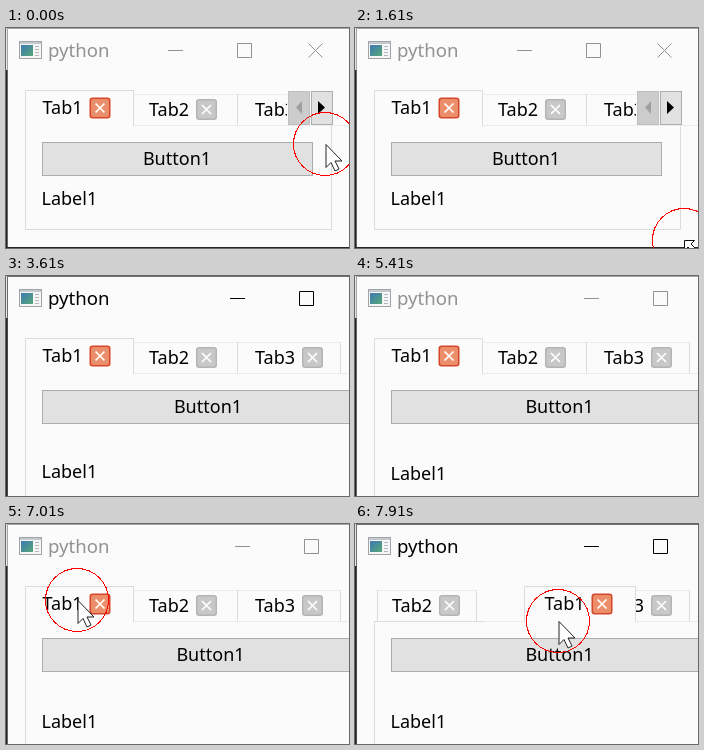
These frames come from a looping animation (343x220 px, 8 s). An HTML page:

```html
<!DOCTYPE html>
<html lang="en">
<head>
<meta charset="utf-8">
<title>Tab window</title>
<style>
  html, body { margin: 0; width: 100%; height: 100%; overflow: hidden; background: #fbfbfb; }
  svg { display: block; width: 343px; height: 220px; animation: grow 8s step-end infinite, focus 8s step-end infinite; }
  text { font: 18px "Noto Sans", "Open Sans", sans-serif; fill: #000; }
  .title { font-size: 18.6px; fill: var(--ink); }
  .glyph { fill: none; stroke: var(--ink); }
  .edge { fill: var(--edge); }
  .line { fill: none; stroke: #dcdcdc; }
  .faint { fill: none; stroke: #ececec; }
  .tab { fill: #fbfbfb; stroke: #dcdcdc; }
  .button { fill: #e1e1e1; stroke: #adadad; }

  /* Everything that follows the window size */
  .controls { transform: translateX(calc(var(--dw) * 1px)); }
  .pane { width: calc(306px + var(--dw) * 1px); height: calc(104px + var(--dw) * .806px); }
  .wide { width: calc(270px + var(--dw) * 1px); }
  .middle { transform: translateX(calc(var(--dw) * .5px)); }
  .label { transform: translateY(calc(var(--dw) * .41px)); }
  .bottom { transform: translateY(calc(var(--dw) * .806px)); }

  .scroll { animation: scroll 8s step-end infinite; }
  .drag { animation: drag 8s step-end infinite; }
  .lifted { animation: lifted 8s step-end infinite; }
  .swap { animation: swap 8s step-end infinite; }
  .pointer { animation: move 8s step-end infinite; }
  .arrow { animation: arrow 8s step-end infinite; }
  .sizer { animation: sizer 8s step-end infinite; }

  @keyframes focus {
    0%, 67.5% { --ink: #929292; --edge: #a6a6a6; }
    35%, 92.5% { --ink: #000; --edge: #6e6e6e; }
    100% { --ink: #000; --edge: #6e6e6e; }
  }
  @keyframes grow {
    0% { --dw: 0; }
    37.5% { --dw: 2; }
    38.75% { --dw: 8; }
    40% { --dw: 18; }
    41.25% { --dw: 30; }
    42.5% { --dw: 43; }
    43.75% { --dw: 54; }
    45% { --dw: 62; }
    46.25% { --dw: 65; }
    47.5% { --dw: 66; }
    50%, 100% { --dw: 67; }
  }
  @keyframes scroll {
    0% { visibility: visible; }
    40%, 100% { visibility: hidden; }
  }
  @keyframes drag {
    0% { transform: none; }
    93.75% { transform: translateX(8px); }
    95% { transform: translateX(42px); }
    96.25% { transform: translateX(80px); }
    97.5% { transform: translateX(120px); }
    98.75%, 100% { transform: translateX(153px); }
  }
  @keyframes lifted {
    0% { visibility: hidden; }
    93.75%, 100% { visibility: visible; }
  }
  @keyframes swap {
    0% { transform: none; }
    96.25% { transform: translateX(-24px); }
    97.5% { transform: translateX(-80px); }
    98.75%, 100% { transform: translateX(-106px); }
  }
  @keyframes arrow {
    0%, 55% { visibility: visible; }
    17.5% { visibility: hidden; }
    100% { visibility: visible; }
  }
  @keyframes sizer {
    0%, 55% { visibility: hidden; }
    17.5% { visibility: visible; }
    100% { visibility: hidden; }
  }
  @keyframes move {
    0% { transform: translate(319px, 116px); }
    1.25% { transform: translate(320px, 120px); }
    2.5% { transform: translate(323px, 133px); }
    3.75% { transform: translate(327px, 150px); }
    5% { transform: translate(332px, 170px); }
    6.25% { transform: translate(336px, 187px); }
    7.5% { transform: translate(339px, 200px); }
    8.75% { transform: translate(341px, 207px); }
    10% { transform: translate(342px, 210px); }
    12.5% { transform: translate(340px, 211px); }
    16.25% { transform: translate(334px, 211px); }
    17.5% { transform: translate(328px, 210px); }
    20% { transform: translate(329px, 212px); }
    37.5% { transform: translate(331px, 214px); }
    38.75% { transform: translate(337px, 218px); }
    40% { transform: translate(347px, 226px); }
    41.25% { transform: translate(359px, 236px); }
    42.5% { transform: translate(372px, 247px); }
    43.75% { transform: translate(400px, 280px); }
    55% { transform: translate(246px, 251px); }
    56.25% { transform: translate(245px, 251px); }
    57.5% { transform: translate(400px, 280px); }
    77.5% { transform: translate(318px, 226px); }
    78.75% { transform: translate(262px, 188px); }
    80% { transform: translate(188px, 137px); }
    81.25% { transform: translate(110px, 84px); }
    82.5% { transform: translate(52px, 51px); }
    83.75% { transform: translate(33px, 57px); }
    85% { transform: translate(48px, 69px); }
    86.25% { transform: translate(64px, 75px); }
    87.5% { transform: translate(71px, 76px); }
    88.75% { transform: translate(58px, 76px); }
    90% { transform: translate(50px, 76px); }
    93.75% { transform: translate(58px, 78px); }
    95% { transform: translate(92px, 83px); }
    96.25% { transform: translate(130px, 88px); }
    97.5% { transform: translate(170px, 93px); }
    98.75%, 100% { transform: translate(203px, 97px); }
  }
</style>
</head>
<body>
<svg viewBox="0 0 343 220">
  <defs>
    <g id="close">
      <rect x=".75" y=".75" width="19.5" height="19.5" rx="2.5" stroke-width="1.5"/>
      <path d="M6 6l9 9m0-9l-9 9" fill="none" stroke="#fff" stroke-width="1.7"/>
    </g>
    <linearGradient id="screen" x2="1" y2="1">
      <stop stop-color="#3d78b4"/>
      <stop offset="1" stop-color="#58a878"/>
    </linearGradient>
  </defs>

  <rect width="343" height="220" fill="#fbfbfb"/>
  <rect class="edge" width="343" height="1"/>
  <rect width="1" height="42" fill="#e6e6e6"/>
  <rect class="edge" x="1" width="1" height="220"/>
  <rect y="42" width="1.5" height="178" fill="#2a2426"/>
  <rect class="bottom" y="219" width="343" height="1" fill="#2a2426"/>

  <!-- Title bar -->
  <rect x="13.5" y="13.5" width="22" height="17" fill="#f6f6f6" stroke="#a0a4a8"/>
  <rect x="14" y="14" width="21" height="2" fill="#c4c9cd"/>
  <rect x="15" y="17" width="12" height="11" fill="url(#screen)"/>
  <path d="M29 18.5h4m-4 3h4m-4 3h4m-4 3h4" stroke="#b4b9bd"/>
  <text class="title" x="42" y="29">python</text>
  <g class="controls">
    <path class="glyph" d="M162 22.5h15M231.500 15.500h14v14h-14zM302.500 15.500l14 14m0-14l-14 14"/>
  </g>

  <!-- Page -->
  <rect class="pane line" x="19.500" y="97.500"/>
  <path class="faint" d="M128 97.500h215"/>
  <rect class="wide button" x="36.500" y="114.500" height="33"/>
  <text class="middle" x="171" y="137" text-anchor="middle">Button1</text>
  <text class="label" x="35.500" y="177">Label1</text>

  <!-- Tabs -->
  <rect x="231" y="66" width="104" height="31" fill="#fbfbfb"/>
  <path class="faint" d="M231 66.500h104"/>
  <path class="line" d="M231.500 66v31m103-31v31"/>
  <text x="249" y="88">Tab3</text>
  <use href="#close" x="296" y="71" fill="#c8c8c8" stroke="#b4b4b4"/>
  <g class="swap">
    <rect x="128" y="66" width="101" height="31" fill="#fbfbfb"/>
    <path class="faint" d="M128 66.500h103"/>
    <text x="143" y="88">Tab2</text>
    <use href="#close" x="190" y="71" fill="#c8c8c8" stroke="#b4b4b4"/>
    <g class="lifted">
      <rect x="228" y="66" width="4" height="31" fill="#fbfbfb"/>
      <path class="line" d="M128.500 66v31m99-31v31"/>
    </g>
  </g>
  <g class="drag">
    <path class="lifted tab" d="M16.500 98V62.500h111V98"/>
    <path class="tab" d="M19.500 98V62.500h108V98"/>
    <path class="lifted" d="M19.500 63.500V98" stroke="#fbfbfb" stroke-width="2"/>
    <text x="36.500" y="86">Tab1</text>
    <use href="#close" x="83.500" y="69.500" fill="#ec8e69" stroke="#d5472c"/>
  </g>

  <g class="scroll">
    <rect x="281" y="62" width="62" height="35" fill="#fbfbfb"/>
    <rect x="282.500" y="63.500" width="21" height="33" fill="#cccccc" stroke="#bfbfbf"/>
    <path d="M296 73v13l-6-6.500z" fill="#a0a0a0"/>
    <rect class="button" x="305.500" y="63.500" width="21" height="33"/>
    <path d="M312 73v13l7-6.500z"/>
  </g>

  <g class="pointer">
    <circle r="31.500" fill="none" stroke="#f00" shape-rendering="crispEdges"/>
    <path class="arrow" d="M1 .5v23l5-5 4 8.500 4-2-4-8h7z" fill="#fff" stroke="#222"/>
    <path class="sizer" d="M.5 .5h10l-3.500 3.500 9 9 3.500-3.500v10h-10l3.500-3.500-9-9-3.500 3.500z" fill="#fff" stroke="#111"/>
  </g>
</svg>
</body>
</html>
```
